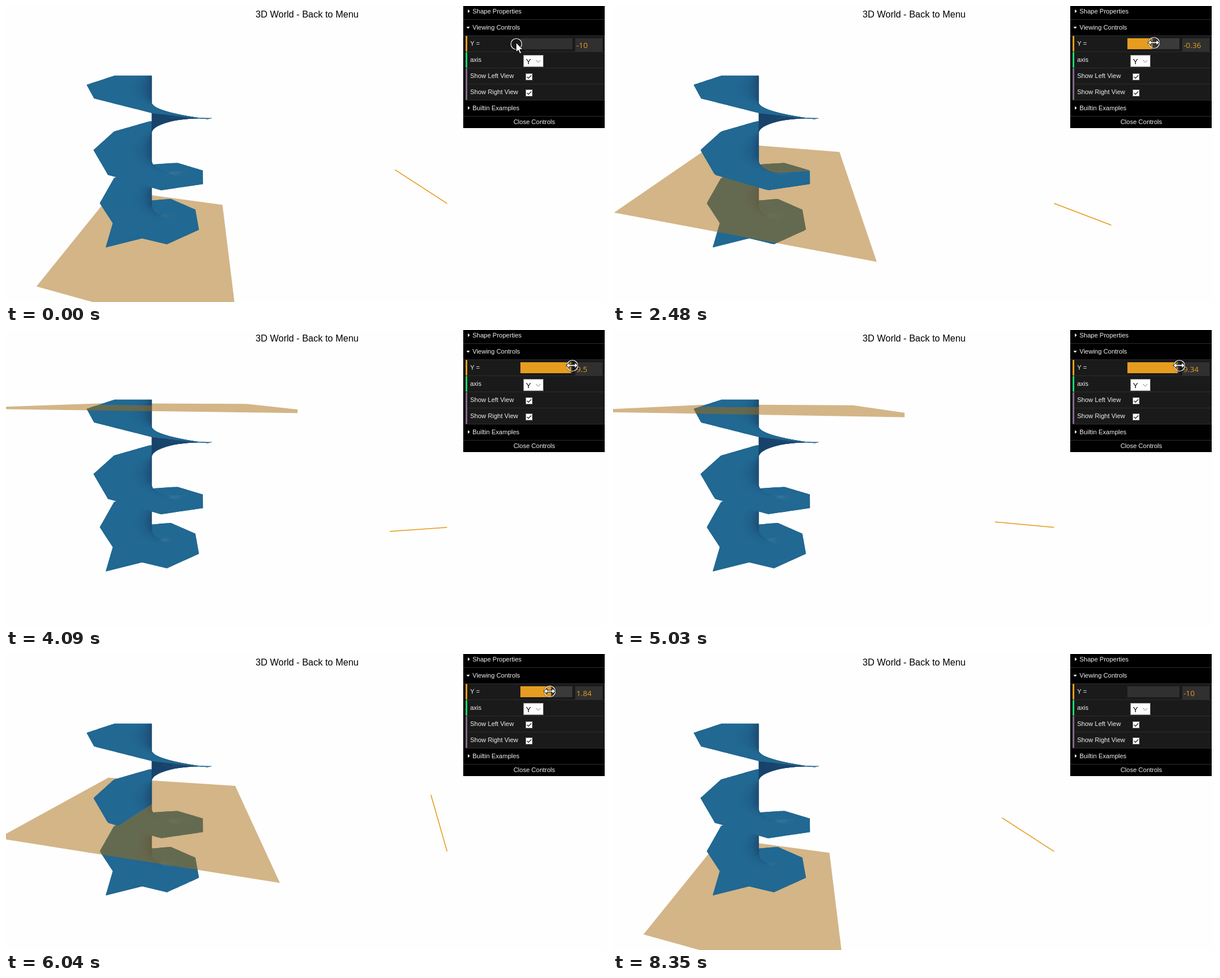
Recreate the animation shown at these times as an HTML page with a canvas. Size 1041 by 514 pixels, loop 8450 ms.

```html
<!DOCTYPE html>
<html lang="en">
<head>
<meta charset="utf-8">
<title>3D World</title>
<style>
  html, body { margin: 0; width: 100%; height: 100%; overflow: hidden; background: #fefefe; }
  canvas, svg { position: absolute; left: 0; top: 0; display: block; }
  svg { font: 11px "Liberation Sans", Arial, sans-serif; fill: #eee; }
  .title { font-size: 16px; fill: #000; }
  .num { font: 13.3px "Open Sans", "Noto Sans", sans-serif; fill: #e69d1f; }
  .row { fill: #1a1a1a; }
  .rule { stroke: #2c2c2c; }
  .field { fill: #303030; }
  .box { fill: #fff; stroke: #8a8a8a; }
  .tick { fill: none; stroke: #333; stroke-width: 1.5; }
</style>
</head>
<body>
<canvas id="view" width="1041" height="514"></canvas>
<svg width="1041" height="514" viewBox="0 0 1041 514">
  <defs>
    <g id="check">
      <rect class="box" x=".5" y=".5" width="11" height="11"/>
      <path class="tick" d="M2.5 6 5 8.5 9.7 3.4"/>
    </g>
  </defs>
  <text class="title" x="521.5" y="20" text-anchor="middle">3D World - Back to Menu</text>

  <rect x="792" width="245" height="212" fill="#000"/>
  <rect class="row" x="799" y="52" width="238" height="112"/>
  <path class="rule" d="M792 23.5h245M792 51.5h245M796 79.5h241M796 107.5h241M796 135.5h241M796 163.5h241M792 191.5h245"/>
  <rect x="796" y="52" width="3" height="27" fill="#e69d1f"/>
  <rect x="796" y="80" width="3" height="27" fill="#1ed36f"/>
  <rect x="796" y="108" width="3" height="55" fill="#806787"/>
  <path fill="#fff" d="M800 6l3.5 3-3.5 3zM797.5 36h6l-3 3.5zM800 174l3.5 3-3.5 3z"/>
  <text x="808" y="13" textLength="">Shape Properties</text>
  <text x="808" y="41">Viewing Controls</text>
  <text x="804" y="69">Y =</text>
  <text x="804" y="97">axis</text>
  <text x="804" y="125">Show Left View</text>
  <text x="804" y="153">Show Right View</text>
  <text x="808" y="181">Builtin Examples</text>
  <text x="915" y="205" text-anchor="middle">Close Controls</text>

  <rect id="slider" class="field" x="891" y="56" width="90" height="19"/>
  <rect id="fill" x="891" y="56" width="0" height="19" fill="#e69d1f"/>
  <rect class="field" x="986" y="56" width="47" height="23"/>
  <text id="value" class="num" x="988" y="73">-10</text>

  <rect class="box" x="896.5" y="85.5" width="34" height="20"/>
  <text x="900.5" y="101" style="font-size:13.3px;fill:#000">Y</text>
  <path d="M918 94l3.8 3.8 3.8-3.8" fill="none" stroke="#777"/>
  <use href="#check" x="900" y="117"/>
  <use href="#check" x="900" y="145"/>

  <g id="cursor">
    <circle r="9.5" fill="none" stroke="#000" stroke-opacity=".45" stroke-width="2.6"/>
    <circle r="9.5" fill="none" stroke="#fff" stroke-width="1.2"/>
    <path id="arrow" d="M-.5-2.5V14L3.3 10.6 6 16.7 8.7 15.5 6 9.6H11.3Z" fill="#fff" stroke="#000"/>
    <path id="resize" d="M-10.5-.5-5-5.5V-2H4V-5.5L9.5-.5 4 4.5V1H-5V4.5Z" fill="#fff" stroke="#000"/>
  </g>
</svg>
<script>
const LOOP = 8450, FRAME = 70;
const RADIUS = 2 * Math.PI, SLICE = 0.8, THIN = 0.05;
const CAM = { x: 5, y: 10, z: 20 }, FOCAL = 341.5, CX = 252.5, CY = 286.5, VIEW_W = 505;

// time, plane height, cursor x, cursor y
const KEYS = [
  [0, -10, 884, 66], [70, -10, 884, 66], [200, -10, 888, 66], [1090, -10, 888, 66],
  [1710, -7.04, 907, 66], [1960, -4.6, 918, 65], [3180, 4.86, 961, 63], [4090, 9.5, 981, 62],
  [4490, 9.93, 984, 62], [4820, 9.93, 984, 62], [5510, 5.75, 961, 63], [6550, -3.5, 918, 67],
  [6730, -5.72, 909, 68], [7460, -10, 887, 68], [7490, -10, 887, 68], [7640, -10, 920, 68],
  [LOOP, -10, 920, 68]
];
const CURSOR_END = 7640;

const $ = id => document.getElementById(id);
const ctx = $('view').getContext('2d');
const mix = (a, b, u) => a + (b - a) * u;
const clamp = (v, lo, hi) => Math.min(hi, Math.max(lo, v));

// Monotone cubic through the keys, held for about one frame at a time
function slope(i, c) {
  if (i < 1 || i > KEYS.length - 2) return 0;
  const rate = j => (KEYS[j + 1][c] - KEYS[j][c]) / (KEYS[j + 1][0] - KEYS[j][0]);
  const a = rate(i - 1), b = rate(i);
  return a * b > 0 ? 2 * a * b / (a + b) : 0;
}
function track(t, c) {
  let i = 0;
  while (i < KEYS.length - 2 && t >= KEYS[i + 1][0]) i++;
  const p = KEYS[i], q = KEYS[i + 1], span = q[0] - p[0];
  const steps = Math.max(1, Math.round(span / FRAME));
  const u = Math.floor((t - p[0]) / span * steps) / steps;
  const w = u * u * (3 - 2 * u);
  return mix(p[c], q[c], w) + span * (u * (1 - u) ** 2 * slope(i, c) - u * u * (1 - u) * slope(i + 1, c));
}

// Camera looks at the middle of the axis
const flat = Math.hypot(CAM.x, CAM.z), far = Math.hypot(flat, CAM.y);
const sinP = CAM.y / far, cosP = flat / far;
function project(x, y, z) {
  const dx = x - CAM.x, dy = y - CAM.y, dz = z - CAM.z;
  const right = (dx * CAM.z - dz * CAM.x) / flat;
  const ahead = -(dx * CAM.x + dz * CAM.z) / flat;
  const depth = ahead * cosP - dy * sinP, up = ahead * sinP + dy * cosP;
  return [CX + FOCAL * right / depth, CY - FOCAL * up / depth];
}

// Direction of the coil's straight section at a height, between mesh slices
function section(y) {
  const k = clamp(Math.floor((y + 10) / SLICE + 1e-9), 0, 24);
  const a = k * SLICE - 10, b = a + SLICE, u = (y - a) / SLICE;
  return [mix(Math.cos(a), Math.cos(b), u), mix(Math.sin(a), Math.sin(b), u)];
}
function rim(y) {
  const [c, s] = section(y);
  return project(RADIUS * c, y, RADIUS * s);
}
const axis = y => project(0, y, 0);

const DARK = [27, 74, 114], BASE = [33, 104, 146];
function shade(y, c, s, u) {
  const r = u * RADIUS;
  const facing = s * (CAM.x - r * c) + r * (CAM.y - y) - c * (CAM.z - r * s);
  if (facing < 0) return 'rgb(23,66,106)';
  const k = clamp((r / Math.hypot(1, r) - 0.1) / 0.82, 0, 1);
  return `rgb(${DARK.map((d, i) => Math.round(mix(d, BASE[i], k)))})`;
}

function polygon(points, style) {
  ctx.fillStyle = style;
  ctx.beginPath();
  points.forEach(p => ctx.lineTo(p[0], p[1]));
  ctx.closePath();
  ctx.fill();
}

// Seen from above, so thin layers painted upwards hide each other correctly
function coil(from, to) {
  const n = Math.ceil((to - from) / THIN - 1e-6);
  const h = (to - from) / n;
  for (let i = 0; i < n; i++) {
    const a = from + i * h, b = a + h, low = i ? a - h : a, mid = a + h / 2;
    const [c, s] = section(mid);
    const paint = ctx.createLinearGradient(...axis(mid), ...rim(mid));
    for (const u of [0, 0.08, 0.16, 0.25, 0.4, 0.6, 0.8, 1]) paint.addColorStop(u, shade(mid, c, s, u));
    polygon([axis(b), rim(b), rim(a), rim(low), axis(low)], paint);
  }
}

function plane(y) {
  const corners = [[-10, -10], [10, -10], [10, 10], [-10, 10]];
  polygon(corners.map(([x, z]) => project(x, y, z)), 'rgba(167,109,17,.5)');
}

function drawScene(y) {
  ctx.clearRect(0, 0, 1041, 514);
  ctx.save();
  ctx.beginPath();
  ctx.rect(0, 0, VIEW_W, 514);
  ctx.clip();
  if (y > -10) coil(-10, y);
  plane(y);
  coil(y, 10);
  ctx.restore();

  const [c, s] = section(y);
  ctx.strokeStyle = '#e69a1a';
  ctx.lineWidth = 1.5;
  ctx.beginPath();
  ctx.moveTo(764, 342.8);
  ctx.lineTo(764 + 107.5 * c, 342.8 - 107.5 * s);
  ctx.stroke();
}

let shown;
function tick() {
  const t = performance.now() % LOOP;
  const y = Math.round(track(t, 1) * 100) / 100;
  const x = Math.round(track(t, 2)), over = x >= 891 && t < CURSOR_END;
  if (y !== shown) {
    drawScene(y);
    $('fill').setAttribute('width', (y + 10) * 4.5);
    $('value').textContent = y;
    shown = y;
  }
  $('slider').style.fill = over ? '#3a3a3a' : '#303030';
  $('cursor').style.display = t < CURSOR_END ? '' : 'none';
  $('cursor').setAttribute('transform', `translate(${x} ${Math.round(track(t, 3))})`);
  $('arrow').style.display = over ? 'none' : '';
  $('resize').style.display = over ? '' : 'none';
  requestAnimationFrame(tick);
}
tick();
</script>
</body>
</html>
```
